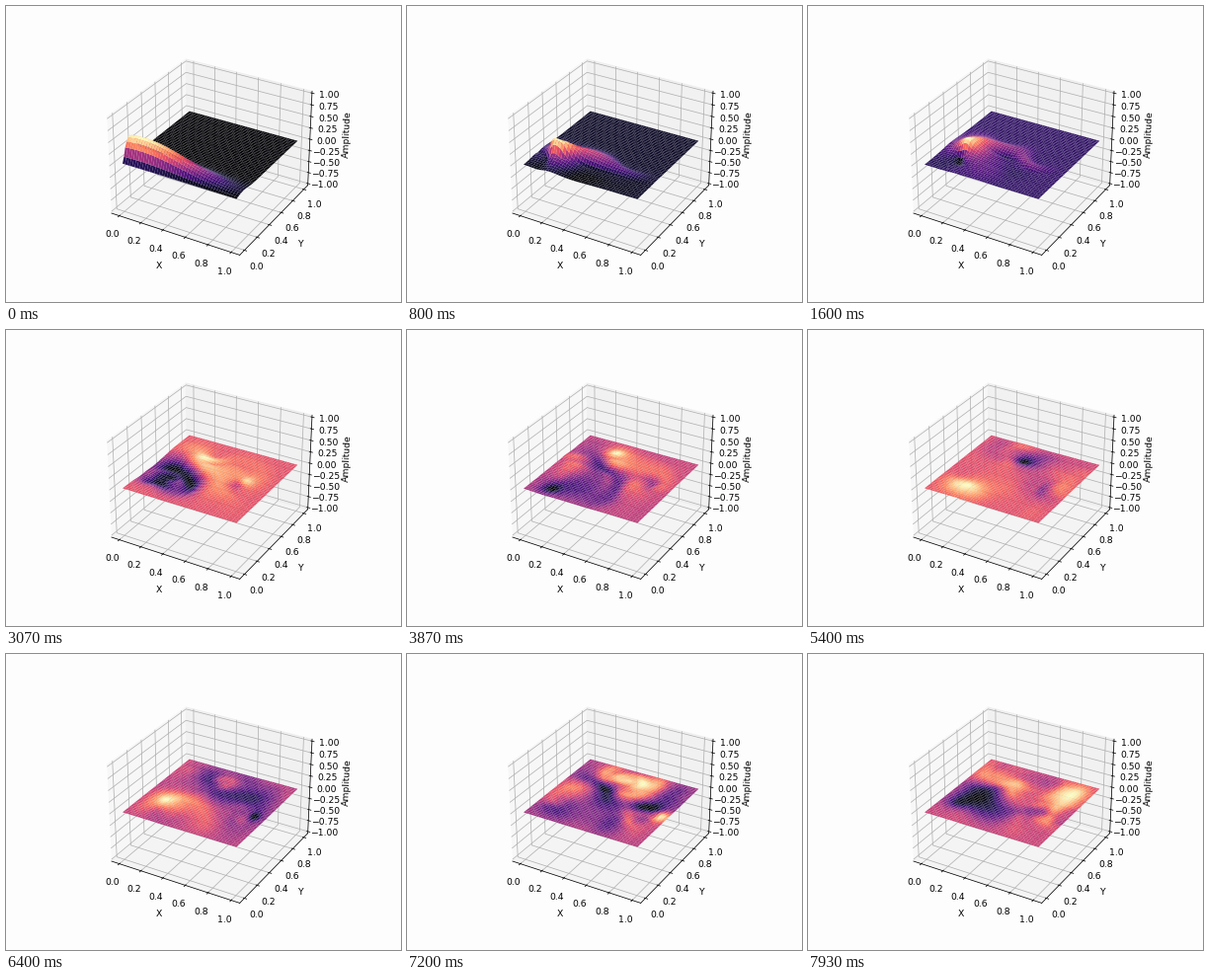
Write a matplotlib script that moves like this. It is 400x300 px and loops after 8 s.

```python
import numpy as np
import matplotlib.pyplot as plt
from matplotlib.animation import FuncAnimation
from mpl_toolkits.mplot3d.art3d import Poly3DCollection

FRAMES, LOOP_MS = 120, 8000
GRID, SKIP = 90, 2          # solver cells per side, drawn every SKIP cells
STEPS = 3                   # solver steps per frame
SPEED = .017                # domain lengths per frame
DECAY = .028                # amplitude loss per frame
LENSES = [(.38, .68, .16), (.78, .42, .19), (.18, .22, .13)]  # x, y, radius

axis = np.linspace(0, 1, GRID + 1)
X, Y = np.meshgrid(axis, axis)


def wave_speed():
    """Uniform medium with round slow spots that trap part of the wave."""
    slow = sum(1 / (1 + np.exp((np.hypot(X - x, Y - y) - r) / .02))
               for x, y, r in LENSES)
    return SPEED * (1 - .55 * np.clip(slow, 0, 1))


def pulse(shift=0):
    y = Y + shift
    ridge = np.exp(-((y - .11) / .10) ** 2) * (1 - .9 * np.exp(-(y / .025) ** 2))
    return .52 * np.exp(-((X - .12) / .55) ** 2) * ridge


def laplacian(u):
    p = np.pad(u, 1, mode="edge")
    return p[2:, 1:-1] + p[:-2, 1:-1] + p[1:-1, 2:] + p[1:-1, :-2] - 4 * u


def simulate():
    courant = (wave_speed() * GRID / STEPS) ** 2
    margin = np.minimum(np.minimum(X, 1 - X), np.minimum(Y, 1 - Y))
    sponge = 1 - .05 * np.clip(1 - margin / .08, 0, 1) ** 2
    u, last = pulse(), pulse(.6 * SPEED / STEPS)
    for frame in range(FRAMES):
        yield u[::SKIP, ::SKIP] * np.exp(-DECAY * frame)
        for _ in range(STEPS):
            u, last = u + sponge * (u - last) + courant * laplacian(u), u
            u = u * (.5 + .5 * sponge)


def corners(a):
    return np.stack([a[:-1, :-1], a[:-1, 1:], a[1:, 1:], a[1:, :-1]],
                    axis=-1).reshape(-1, 4)


QX, QY = (corners(a[::SKIP, ::SKIP]) for a in (X, Y))
HEIGHTS = [corners(u) for u in simulate()]


def quads(z):
    return np.stack([QX, QY, z], axis=-1)


fig = plt.figure(figsize=(6, 4.5), dpi=200 / 3, facecolor="#fefdfe")
ax = fig.add_subplot(projection="3d", facecolor="none")
surface = Poly3DCollection(quads(HEIGHTS[0]), cmap="magma")
ax.add_collection3d(surface)

pad = .05 + 1.1 / 48
ax.set_xlim(-pad, 1 + pad)
ax.set_ylim(-pad, 1 + pad)
ax.set_zlim(-1 - 1 / 24, 1 + 1 / 24)
ax.set_xticks(np.arange(6) / 5)
ax.set_yticks(np.arange(6) / 5)
ax.set_zticks(np.linspace(-1, 1, 9))
ax.set_xlabel("X")
ax.set_ylabel("Y")
ax.set_zlabel("Amplitude")


def update(frame):
    z = HEIGHTS[frame]
    level = z.mean(axis=1)
    surface.set_verts(quads(z))
    surface.set_array(level)
    surface.set_clim(level.min(), level.max())
    return [surface]


anim = FuncAnimation(fig, update, frames=FRAMES, interval=LOOP_MS / FRAMES,
                     init_func=lambda: update(0), repeat=True,
                     repeat_delay=0, blit=False)
plt.show()
```
